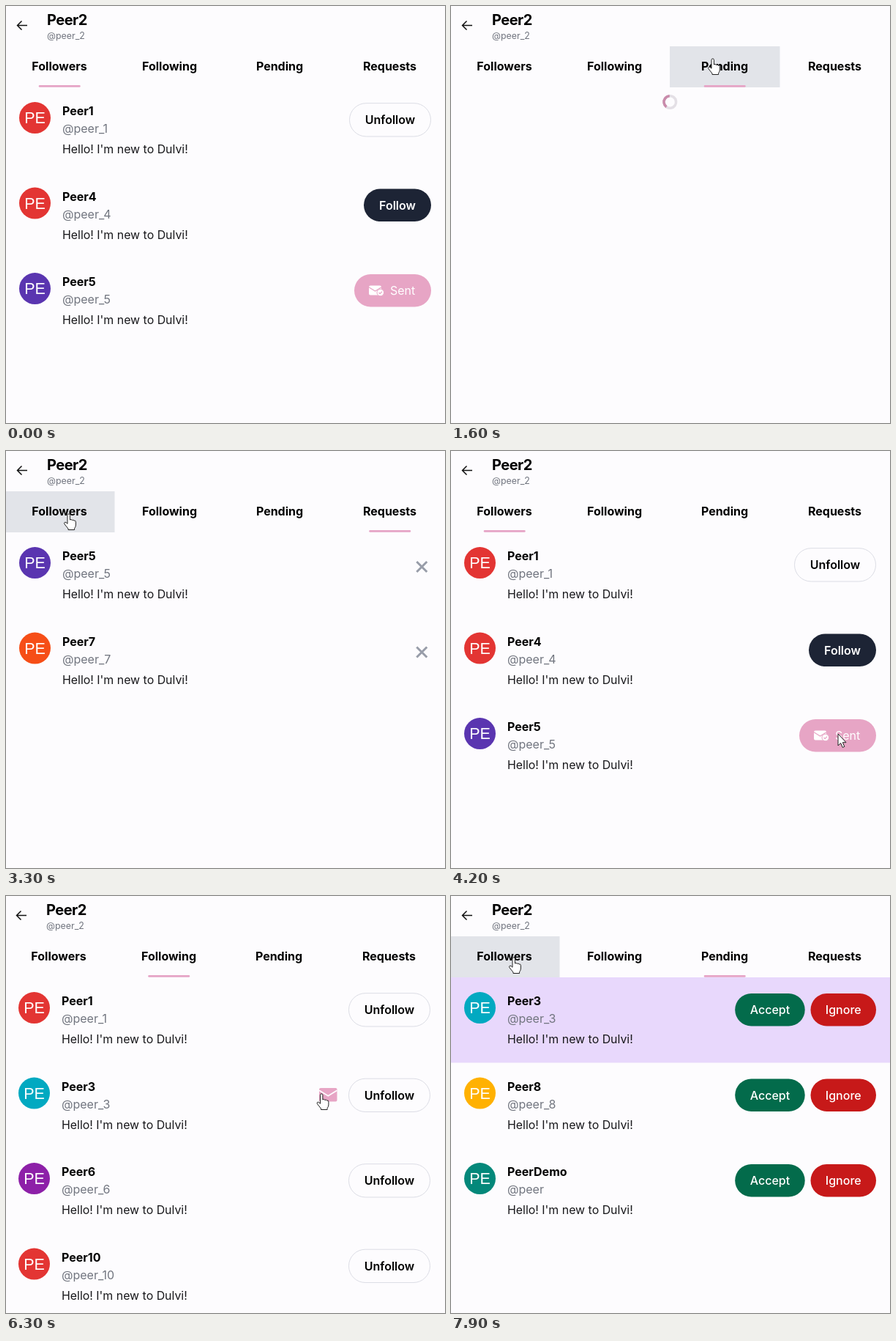
Animation of 600 by 569 pixels, one loop 8000 ms. Source, as an HTML page:

```html
<!DOCTYPE html>
<html lang="en">
<head>
<meta charset="utf-8">
<title>Follow lists</title>
<style>
html, body { margin: 0; width: 100%; height: 100%; overflow: hidden; background: #fdfcfe; }
svg { display: block; width: 600px; height: 569px; font: 16px Inter, sans-serif; }
.bold { font-weight: 700; }
.semi { font-weight: 600; }
.medium { font-weight: 500; }
.muted { fill: #71757f; }
.mid { text-anchor: middle; }
.bio { font-size: 15.9px; fill: #18181b; }
.light { fill: #fff; }
.title { font-size: 20px; letter-spacing: -.025em; }
.initials { font: 21.5px "Liberation Sans", sans-serif; fill: #fff; }
</style>
</head>
<body>
<svg viewBox="0 0 600 569">
  <g id="page">
    <g id="tabs"></g>
    <path d="M29 26.5H15.5M21.5 20.5L15.5 26.5L21.5 32.5" fill="none" stroke="#111" stroke-width="1.5"/>
    <text x="56" y="26" class="bold title">Peer2</text>
    <text x="56" y="45" font-size="12.4" class="muted">@peer_2</text>
    <rect id="underline" y="108" width="57" height="2.8" rx="1.4" fill="#e6a4c6"/>
    <g id="list"></g>
  </g>
  <g id="spinner" fill="none" stroke-width="3.6">
    <circle r="8.3" stroke="#e4e0e6"/>
    <circle r="8.3" stroke="#c98bab" pathLength="360" stroke-dasharray="140 220"/>
  </g>
  <g id="cursor" fill="#fff" stroke="#222" stroke-linejoin="round">
    <path id="hand" d="M-2 12V1.6a1.7 1.7 0 0 1 3.4 0V8q1.6-1.4 3 .4q1.7-.9 2.7.6q2.2-.5 2.3 1.8V15q-.2 2.7-1.8 4.5V21.5H-1V20L-6 13.8q-1-2 .6-2.7q1.4-.3 3.4 2.2z"/>
    <path id="arrow" d="M0 0V16L3.7 12.6L6.2 18.5L8.8 17.4L6.3 11.7H11z"/>
  </g>
</svg>
<script>
const $ = id => document.getElementById(id);
const LOOP = 8000, STEP = 100, ROW = 116.5, TOP = 111, TAB = 150.5;
const REST = 200, LOAD = 300, SPEED = 0.9; // ms before a click, ms to load, px per ms
const PINK = "#e7a5c5";

const text = (x, y, s, cls, fill = "") => `<text x="${x}" y="${y}" class="${cls}" ${fill}>${s}</text>`;
const pill = (w, fill, label, cls = "semi light", right = 581) =>
  `<rect x="${right - w}" y="22" width="${w}" height="44.5" rx="22.2" fill="${fill}"/>` +
  text(right - w / 2, 50, label, "mid " + cls);
const envelope = (x, y, w, h, fill, flap) =>
  `<rect x="${x}" y="${y}" width="${w}" height="${h}" rx="2" fill="${fill}"/>
   <path d="M${x} ${y + h * .18}l${w / 2} ${h * .4}l${w / 2} ${-h * .4}" fill="none" stroke="${flap}" stroke-width="${w / 14}"/>`;

const unfollow = `<rect x="469.5" y="21.7" width="111" height="45.3" rx="22.6" fill="none" stroke="#dcdde5"/>` +
  text(525, 50, "Unfollow", "mid semi");
const follow = pill(92, "#1d2435", "Follow");
const sent = pill(105, PINK, "") + text(525, 50, "Sent", "light") + envelope(496, 37.5, 17, 13, "#fff", PINK) +
  `<circle cx="511.8" cy="47" r="4.8" fill="#fff" stroke="${PINK}"/>
   <path d="M509.6 47l1.6 1.6l2.8-3" fill="none" stroke="${PINK}" stroke-width="1.2"/>`;
const mail = envelope(429, 34.5, 24.5, 18.5, PINK, "#fdfcfe");
const answer = pill(95.5, "#036b4b", "Accept", "medium light", 483.7) + pill(89.5, "#c71919", "Ignore", "medium light");
const cancel = `<path d="M561.3 40l14 14m0-14l-14 14" stroke="#989da9" stroke-width="3"/>`;

const colors = { 3: "#02a9c1", 5: "#5a35b0", 6: "#8d20a8", 7: "#f64e17", 8: "#ffb101", Demo: "#04887a" };
const tabs = [
  { name: "Followers", people: [1, 4, 5], action: id => ({ 1: unfollow, 4: follow, 5: sent })[id] },
  { name: "Following", people: [1, 3, 6, 10], action: id => unfollow + (id === 3 ? mail : "") },
  { name: "Pending", people: [3, 8, "Demo"], action: () => answer },
  { name: "Requests", people: [5, 7], action: () => cancel }
];

const row = (id, i, action) => `<g transform="translate(0 ${TOP + i * ROW})">
  <circle cx="39.5" cy="41.6" r="21.5" fill="${colors[id] || "#e33533"}"/>
  ${text(39.5, 49.3, "PE", "mid initials")}
  ${text(77, 38, "Peer" + id, "bold")}
  ${text(77, 62, "@peer" + (id > 0 ? "_" + id : ""), "muted")}
  ${text(77, 90, "Hello! I'm new to Dulvi!", "bio")}
  ${action(id)}</g>`;
const highlight = `<rect y="${TOP}" width="600" height="${ROW}" fill="#e8d8fc"/>`;

// Pointer stops; one with a tab opens it by a click, from inside a list it marks the first row
const stops = [
  { at: 100, x: 470, y: 330 },
  { at: 600, x: 228, y: 86, tab: 1 },
  { at: 1300, x: 358, y: 72, tab: 2 },
  { at: 2200, x: 515, y: 80, tab: 3 },
  { at: 2500, x: 219.5, y: 87 },
  { at: 3200, x: 86, y: 86, tab: 0 },
  { at: 4100, x: 529, y: 386, tab: 3 },
  { at: 5300, x: 233, y: 86, tab: 1 },
  { at: 6300, x: 431.5, y: 270, tab: 2 },
  { at: 7800, x: 86, y: 84 }
];
const views = [{ at: -LOOP, y: 0, tab: 0 }, ...stops.filter(s => "tab" in s)];

// Travel at a steady pace, eased, never leaving before the click
function pointerAt(t) {
  const n = stops.findIndex(s => s.at > t);
  if (n < 1) return n ? stops.at(-1) : stops[0];
  const a = stops[n - 1], b = stops[n];
  const start = Math.max(a.at + REST, b.at - Math.hypot(b.x - a.x, b.y - a.y) / SPEED);
  const k = Math.max(0, (t - start) / (b.at - start)), e = k * k * (3 - 2 * k);
  return { x: a.x + (b.x - a.x) * e, y: a.y + (b.y - a.y) * e };
}

$("tabs").innerHTML = tabs.map(({ name }, i) =>
  `<rect x="${i * TAB - 2}" y="55" width="${TAB}" height="56" fill="#e2e4e9"/>` +
  text(i * TAB + 73, 88, name, "mid bold")).join("");
const tabRects = document.querySelectorAll("#tabs rect");

const show = (el, on) => el.setAttribute("visibility", on ? "visible" : "hidden");
const move = (el, x, y, r = 0) => el.setAttribute("transform", `translate(${x} ${y}) rotate(${r})`);
let shown;

function draw(now) {
  const t = Math.floor(now % LOOP / STEP) * STEP;
  const view = views.findLast(v => v.at + REST <= t);
  const { people, action } = tabs[view.tab];
  const age = t - view.at - REST, loaded = age >= LOAD;

  const key = view.at + "/" + loaded;
  if (key !== shown) {
    shown = key;
    $("list").innerHTML = loaded
      ? (view.y > TOP ? highlight : "") + people.map((id, i) => row(id, i, action)).join("") : "";
    $("underline").setAttribute("x", view.tab * TAB + 44.7);
    move($("page"), loaded && people.length > 3 ? -1 : 0, 0); // room for the scrollbar
  }

  show($("spinner"), !loaded);
  move($("spinner"), 299.3, 131, 90 + age * 0.36);

  // The tab background trails the pointer by one step
  const { x, y } = pointerAt(t), past = pointerAt(t - STEP);
  const hovered = t > STEP && past.y < TOP ? Math.floor((past.x + 2) / TAB) : -1;
  tabRects.forEach((rect, i) => show(rect, i === hovered));

  const hand = y < TOP || (view.tab === 1 && Math.abs(x - 441) < 13);
  show($("hand"), t >= STEP && hand);
  show($("arrow"), t >= STEP && !hand);
  move($("cursor"), x, y);
  requestAnimationFrame(draw);
}
requestAnimationFrame(draw);
</script>
</body>
</html>
```
